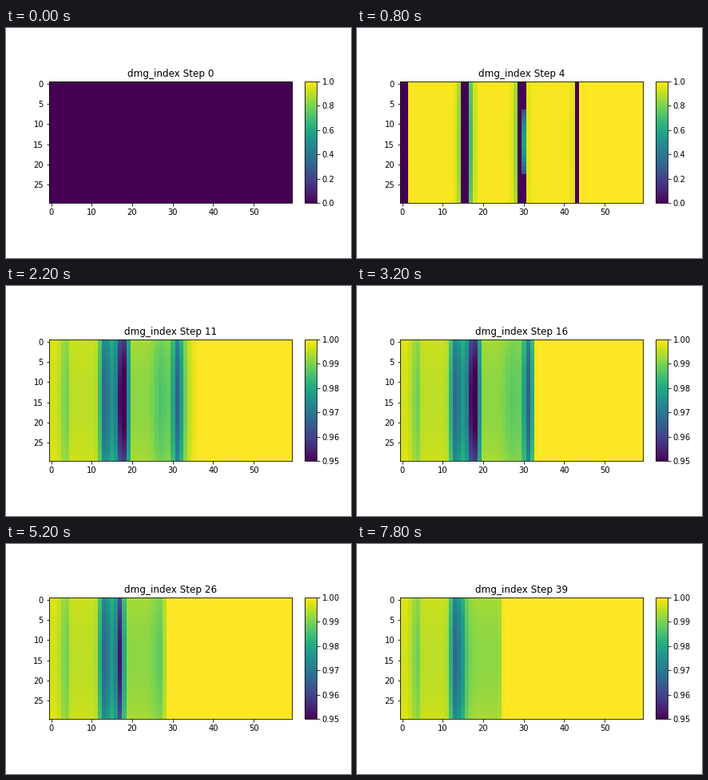
A matplotlib script that plays this animation: 432 by 288 pixels, repeating every 8 s.

```python
import numpy as np
import matplotlib.pyplot as plt
from matplotlib.animation import FuncAnimation

W, H, DPI = 432, 288, 72
ROWS, COLS = 30, 60
STEPS, INTERVAL = 40, 200
SWEEP_END = 8      # from this step on every cell is reached
STRIDE = 14        # columns reached per step during the sweep

col = np.arange(COLS)
row = np.arange(ROWS)
y = np.abs(row - 14.5) / 14.5
BOW = (1 - 0.22 * y ** 2)[:, None]


def dip(center, depth, left, right):
    width = np.where(col < center, left, right)
    return depth * np.exp(-((col - center) / width) ** 2)


def ease(x):
    x = np.clip(x, 0, 1)
    return x * x * (3 - 2 * x)


def sweep(step):
    """Windows fill from right to left; the seams between them heal with age."""
    loss = np.where(col < 44, 0.012, 0)
    seams = [(k, 57 - STRIDE * k, step - k) for k in range(1, 4) if k < step]
    for k, seam, age in seams:
        loss = loss + dip(seam + 2, 0.3 / age ** 3, 0.5, 0.8)
        loss = loss + dip(seam - 1, 0.15 / max(1, age - 1) ** 2, 0.8, 0.5)
    grid = 1 - loss * BOW
    grid[:, :58 - STRIDE * min(step, 4)] = 0
    for k, seam, age in seams:
        if age < 4:
            grid[:, seam] = 0
        if age < 3:
            grid[:, seam + 1] = 0
        if age == 2:
            grid[:, seam + 1] = np.where(y < 0.55, 0.56 - 1.1 * y ** 2, 0)
    return grid


def settle(step):
    """A full front and an inner repair front both creep to the left."""
    t = ease((step - 8) / 4)
    front = np.interp(step, [8, 16, 22, 31, 39], [39, 33.4, 31.4, 26.2, 25.4])
    inner = np.interp(step, [22, 30, 36, 39], [20, 16.5, 16.5, 16])
    soft = np.interp(step, [8, 14], [6, 1.5])

    loss = 5 + 3.5 * ease((col - 10) / 8) - 1.5 * (col < 2)
    loss += dip(3.6, 7, 0.8, 0.8)
    loss += dip(13.8 - 0.8 * t, 27, 1.15, 2.4)
    loss += dip(17.7, 46, 1.6, 1.3) * np.clip(inner - col, 0, 1)
    loss += dip(26.3 + t, 13 - 9 * t, 1 + 1.2 * t, 1 + 1.2 * t)
    loss += dip(31, 26, 1.1, 1.3)
    loss *= np.clip((front - col) / soft, 0, 1) ** 2
    return 1 - loss / 1000 * BOW


def field(step):
    if step == 0:
        return np.zeros((ROWS, COLS))
    return sweep(step) if step < SWEEP_END else settle(step)


def panel(x, y0, w, h):
    return fig.add_axes([x / W, y0 / H, w / W, h / H])


fig = plt.figure(figsize=(W / DPI, H / DPI), dpi=DPI)
ax = panel(54, 68.9, 304.2, 152.1)
image = ax.imshow(field(0), cmap="viridis", vmin=0, vmax=1,
                  interpolation="nearest", aspect="auto")
fig.colorbar(image, cax=panel(373.6, 68.9, 15.2, 152.1))
title = ax.set_title("dmg_index Step 0")


def draw(step):
    image.set_data(field(step))
    image.set_clim(0 if step < SWEEP_END else 0.95, 1)
    title.set_text(f"dmg_index Step {step}")
    return image, title


anim = FuncAnimation(fig, draw, frames=STEPS, interval=INTERVAL,
                     repeat=True, repeat_delay=0)
plt.show()
```
